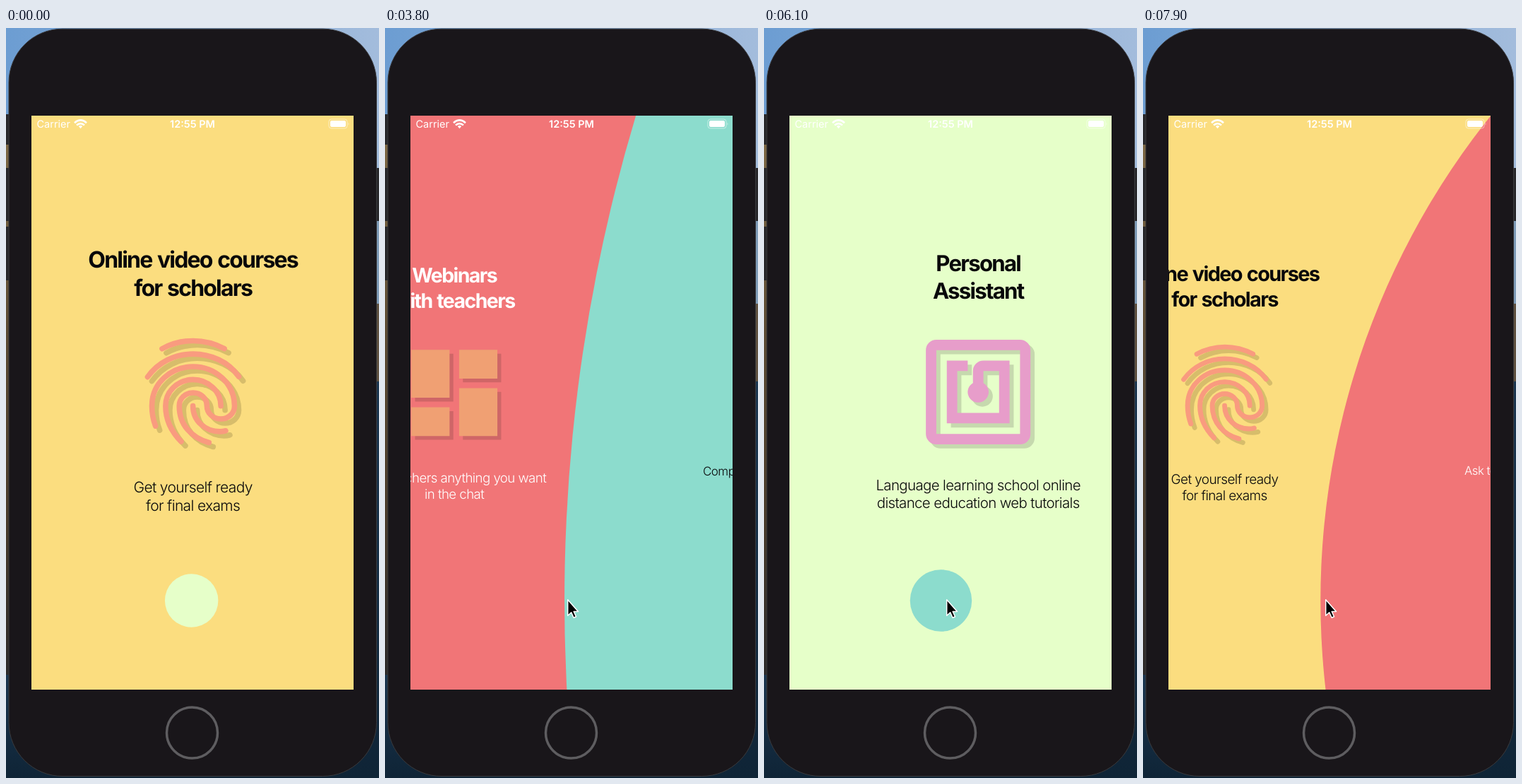
Animation of 528 by 1061 pixels, one loop 8 s. Source, as an HTML page:

```html
<!DOCTYPE html>
<html lang="en">
<head>
<meta charset="utf-8">
<title>Onboarding</title>
<style>
  html, body { margin: 0; width: 100%; height: 100%; overflow: hidden; background: #19161a; }
  svg { display: block; width: 528px; height: 1061px; }
  text { font-family: Inter, "Open Sans", sans-serif; text-rendering: geometricPrecision; }
  .title { font-size: 32px; font-weight: 700; letter-spacing: -1.8px; word-spacing: 1.8px; text-anchor: middle; }
  .note { font-size: 21px; font-weight: 300; letter-spacing: -.66px; text-anchor: middle; }
  .bar { font-size: 14.5px; fill: #fff; }
</style>
</head>
<body>
<svg viewBox="0 0 528 1061" xmlns="http://www.w3.org/2000/svg">
  <defs>
    <clipPath id="screen"><rect x="36" y="124" width="456" height="812"/></clipPath>
    <linearGradient id="sky">
      <stop stop-color="#6c9dd2"/><stop offset="1" stop-color="#a3bcdc"/>
    </linearGradient>
    <linearGradient id="rock" x2="0" y2="1">
      <stop stop-color="#7d6844"/><stop offset=".35" stop-color="#5d4c34"/>
      <stop offset=".7" stop-color="#4a3c2c"/><stop offset="1" stop-color="#2c2a2a"/>
    </linearGradient>
    <linearGradient id="sea" x2="0" y2="1">
      <stop stop-color="#1b3650"/><stop offset="1" stop-color="#0f2436"/>
    </linearGradient>
  </defs>

  <rect width="528" height="200" fill="url(#sky)"/>
  <rect y="165" width="264" height="755" fill="url(#rock)"/>
  <rect y="915" width="264" height="146" fill="url(#sea)"/>
  <rect x="264" y="198" width="264" height="200" fill="#7f9cb8"/>
  <rect x="264" y="390" width="264" height="112" fill="#5f5140"/>
  <rect x="264" y="500" width="264" height="561" fill="url(#sea)"/>
  <g fill="#27272a">
    <rect y="122" width="8" height="43"/>
    <rect y="198" width="8" height="75"/>
    <rect y="281" width="8" height="76"/>
    <rect x="520" y="198" width="8" height="75"/>
  </g>
  <rect x="4" y="1.200" width="520.5" height="1057.300" rx="76" fill="#19161a" stroke="#3a3a3d"/>
  <circle cx="263.5" cy="997" r="36" fill="none" stroke="#5e5d60" stroke-width="3.5"/>

  <g clip-path="url(#screen)">
    <rect id="back" x="36" y="124" width="456" height="812"/>
    <circle id="disc" cy="810"/>
    <g id="pages"></g>
    <g id="status">
      <text class="bar" x="43.5" y="141">Carrier</text>
      <text class="bar" x="264" y="141" text-anchor="middle" font-weight="600">12:55 PM</text>
      <g fill="none" stroke="#fff" stroke-width="2.6">
        <path d="M97 134.2Q105.5 126.6 114 134.2M100 137.5Q105.5 132.6 111 137.5"/>
        <path d="M102.8 139L105.5 142.3L108.2 139Q105.5 136.8 102.8 139Z" fill="#fff" stroke="none"/>
      </g>
      <rect x="457" y="129" width="26" height="13" rx="3.5" fill="none" stroke="#fff" stroke-opacity=".5"/>
      <rect x="459" y="131" width="22" height="9" rx="2" fill="#fff"/>
      <path d="M484.5 133.5q1.8 2 0 4z" fill="#fff" fill-opacity=".5"/>
    </g>
  </g>
  <path id="cursor" d="M0 0V22.5L5 18L8.400 25.500L11.800 24L8.500 16.600H14.800Z"
    fill="#000" stroke="#fff" stroke-width="1.5" stroke-linejoin="round"/>
</svg>

<script>
const LOOP = 8000, STEP = 100, DURATION = 1500;
const CX = 264, CY = 531, WIDTH = 456;
const PT = WIDTH / 375, RADIUS = 30, LIMIT = 15;
const CLICKS = [-1425, 1259, 3455, 5130, 6603, 7540];

const whorl = [
  "M250-800Q358-859 481-859T714-801",
  "M142-590Q202-673 291-717T481-761Q582-761 673-718T822-592",
  "M201-224Q174-297 174-374Q174-499 264-583T481-667Q607-667 698-582.5T790-374Q790-332 760-304.5T688-277Q646-277 615-305T584-374Q584-416 554-444T481-472Q438-472 408-444T378-374Q378-270 440-198T599-101",
  "M392-109Q276-226 276-374Q276-457 336-513.5T481-570Q565-570 626.5-513T688-374",
  "M480-374Q480-290 540-236.5T680-183Q702-183 724-189"
].join("");

const solid = d => color =>
  `<path transform="scale(7.6) translate(-12 -12)" fill="${color}" d="${d}"/>`;
const line = d => color =>
  `<path transform="scale(.19) translate(-480 480)" fill="none" stroke="${color}" stroke-width="40" stroke-linecap="round" d="${d}"/>`;

const PAGES = [
  { back: "#fbdd7f", ink: "#08080a", tint: "#f99b7f", shade: "#d7bd6b",
    title: ["Online video courses", "for scholars"],
    note: ["Get yourself ready", "for final exams"],
    icon: line(whorl) },
  { back: "#f17577", ink: "#fff", tint: "#f0a073", shade: "#cf6667",
    title: ["Webinars", "with teachers"],
    note: ["Ask teachers anything you want", "in the chat"],
    icon: solid("M3 3h8v10H3zM3 15h8v6H3zM13 11h8v10h-8zM13 3h8v6h-8z") },
  { back: "#8cdccd", ink: "#08080a", tint: "#8b9ecb", shade: "#77bbae",
    title: ["Interactive", "Homework"],
    note: ["Complete excercises, watch", "your progress"],
    icon: solid("M17 16l-4-4V8.82C14.16 8.4 15 7.3 15 6a3 3 0 1 0-6 0c0 1.3.84 2.4 2 2.82V12l-4 4H3v5h5v-3.05l4-4.2 4 4.2V21h5v-5z") },
  { back: "#e6ffc9", ink: "#08080a", tint: "#e79dca", shade: "#c6d9ae",
    title: ["Personal", "Assistant"],
    note: ["Language learning school online", "distance education web tutorials"],
    icon: solid("M20 2H4a2 2 0 0 0-2 2v16a2 2 0 0 0 2 2h16a2 2 0 0 0 2-2V4a2 2 0 0 0-2-2zm0 18H4V4h16zM18 6h-5a2 2 0 0 0-2 2v2.28A2 2 0 1 0 13 10.28V8h3v8H8V8h2V6H6v12h12z") }
];

const $ = id => document.getElementById(id);
const back = $("back"), disc = $("disc"), cursor = $("cursor");

const rows = (list, cls, y, gap) => list.map((s, i) =>
  `<text class="${cls}" y="${y + i * gap - CY}">${s}</text>`).join("");

$("pages").innerHTML = PAGES.map(p => `<g fill="${p.ink}">
  ${rows(p.title, "title", 339, 40.4)}
  <g transform="translate(0 ${514.5 - CY})">
    <g transform="translate(6 6)">${p.icon(p.shade)}</g>${p.icon(p.tint)}
  </g>
  ${rows(p.note, "note", 657.2, 25.4)}</g>`).join("");
const groups = [...$("pages").children];

// cubic-bezier(.25, .1, .25, 1)
function ease(x) {
  if (x <= 0) return 0;
  if (x >= 1) return 1;
  let lo = 0, hi = 1;
  for (let i = 0; i < 30; i++) {
    const m = (lo + hi) / 2;
    if (.75 * m * (1 - m) + m ** 3 < x) lo = m; else hi = m;
  }
  return .3 * lo * (1 - lo) ** 2 + 3 * lo * lo * (1 - lo) + lo ** 3;
}

// Each click heads for the next page from wherever the scroll is.
function scrollAt(time) {
  let from = 3, to = 3, start = 0;
  const at = t => from + (to - from) * ease((t - start) / DURATION);
  for (const click of CLICKS) {
    if (click > time) break;
    from = at(click);
    to = Math.round(from) + 1;
    start = click;
  }
  return at(time);
}

function draw(time) {
  const pos = scrollAt(time), n = Math.floor(pos), p = pos - n;
  const current = PAGES[n % 4], next = PAGES[(n + 1) % 4];
  const growing = p < .5;
  const left = growing ? LIMIT * (1 - 2 * p) : LIMIT * (2 * p - 1);
  const r = (RADIUS + 2 ** (LIMIT - left)) * PT;
  const reach = left / LIMIT * RADIUS * PT;

  back.setAttribute("fill", (growing ? current : next).back);
  disc.setAttribute("fill", (growing ? next : current).back);
  disc.setAttribute("r", r);
  disc.setAttribute("cx", growing ? CX - reach + r : CX + reach - r);

  groups.forEach((g, i) => {
    const shift = i === n % 4 ? -p : i === (n + 1) % 4 ? 1 - p : 1;
    g.style.display = Math.abs(shift) < 1 ? "" : "none";
    g.setAttribute("transform",
      `translate(${CX + shift * WIDTH} ${CY}) scale(${1 - .3 * Math.abs(shift)})`);
  });

  cursor.style.display = time < 1100 ? "none" : "";
  cursor.setAttribute("transform", `translate(${time < 3300 ? 257.7 : 258.7} 808.8)`);
}

const origin = performance.now();
function tick() {
  const t = (performance.now() - origin) % LOOP;
  draw(Math.floor(t / STEP) * STEP);
  requestAnimationFrame(tick);
}
tick();
</script>
</body>
</html>
```
